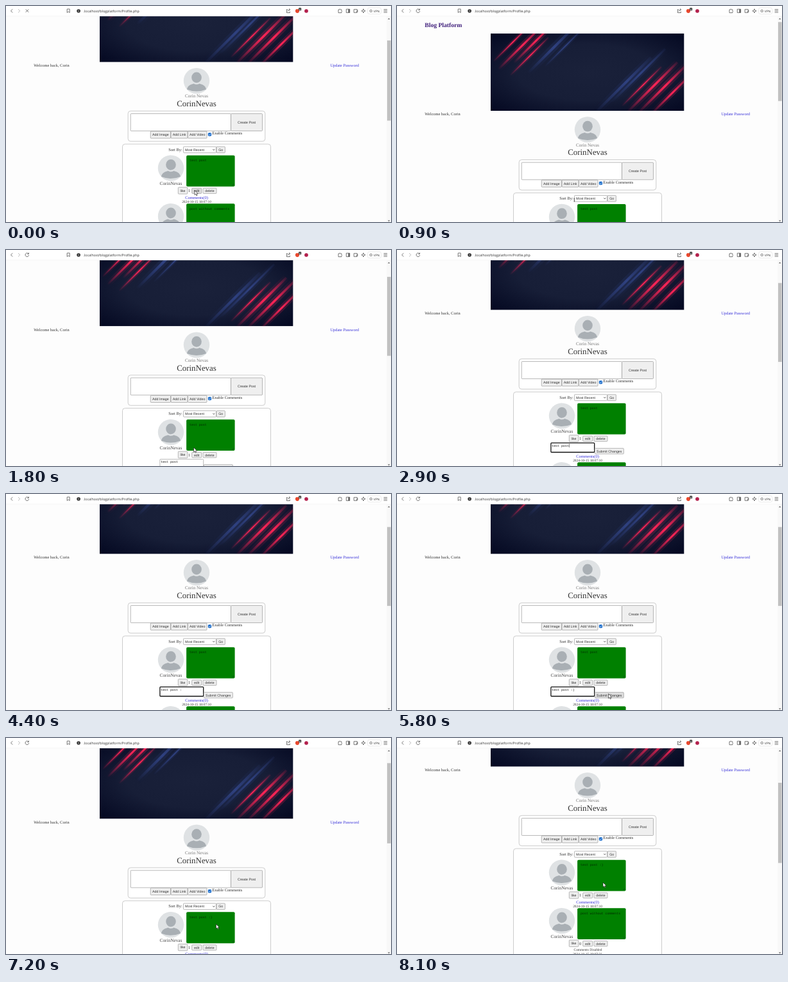
Write an HTML page that moves like this. It is 600 by 338 pixels and loops after 8.2 s.

```html
<!DOCTYPE html>
<html lang="en">
<head>
<meta charset="utf-8">
<title>Profile page</title>
<style>
  html, body { margin: 0; width: 100%; height: 100%; overflow: hidden; background: #fdfdfd; }
  svg { display: block; width: 600px; height: 338px; text-rendering: geometricPrecision; }
  .serif { font-family: "Liberation Serif", "Times New Roman", serif; }
  .sans { font-family: "Liberation Sans", Arial, sans-serif; }
  .mono { font-family: "Liberation Mono", monospace; white-space: pre; }
  .ui { font-family: "Open Sans", sans-serif; }
  .icon { fill: none; stroke: #555; stroke-width: .8; }
</style>
</head>
<body>
<svg id="stage" viewBox="0 0 600 338"></svg>
<script>
const LOOP = 8200, STEP = 100;
const FORM_OPEN = 300, FORM_SENT = 6200, FORM_HEIGHT = 17;
const USER = { first: 'Corin', full: 'Corin Nevas', login: 'CorinNevas' };
const LINK = '#3730d8', INK = '#333';
const ARROW = 'M0 0V7.2L1.7 5.7 2.9 8.3 4 7.8 2.9 5.3H5.2Z', IBEAM = 'M0 1H1.6M.8 1V6M0 6H1.6';

// Builders for the repeated pieces of the page
const text = (x, y, str, { size = 6.4, fill = INK, anchor = 'start', font = 'serif', more = '' } = {}) =>
  `<text class="${font}" x="${x}" y="${y}" font-size="${size}" fill="${fill}" text-anchor="${anchor}" ${more}>${str}</text>`;

const centered = (x, y, str, size, fill) => text(x, y, str, { size, fill, anchor: 'middle' });

const box = (x, y, w, h, { fill = '#fff', stroke = '#8a8a8a', r = 1, line = .6, more = '' } = {}) =>
  `<rect x="${x}" y="${y}" width="${w}" height="${h}" rx="${r}" fill="${fill}" stroke="${stroke}" stroke-width="${line}" ${more}/>`;

const button = (x, y, w, h, label, id = '') =>
  box(x, y, w, h, { fill: '#efefef', more: id && `id="${id}"` }) +
  text(x + w / 2, y + h / 2 + 1.9, label, { size: 5.33, anchor: 'middle', font: 'sans' });

const avatar = (x, y) => `<g transform="translate(${x} ${y})">
  <circle r="20.2" fill="#dfe2e4"/>
  <ellipse cy="-5.2" rx="7.8" ry="8.4" fill="#a9afb4"/>
  <path d="M-15 13.5C-14 7 -8 5.5 -4.5 4.5Q0 7 4.5 4.5C8 5.5 14 7 15 13.5Q8 16.5 0 16.5T-15 13.5Z" fill="#a9afb4"/></g>`;

const post = (y, message, likes, ids = {}) =>
  avatar(257, y + 19.7) +
  centered(257, y + 46.4, USER.login, 7.3, '#444') +
  box(281.1, y - .2, 75.5, 48.8, { fill: '#008000', stroke: 'none', r: 2 }) +
  text(286, y + 9.2, message, { size: 4.95, fill: '#022802', font: 'mono', more: ids.message ? `id="${ids.message}"` : '' }) +
  `<path d="M352.5 ${y + 46.8}l2.5 -2.5M354 ${y + 47}l1 -1" stroke="#033" stroke-width=".5"/>` +
  button(268.3, y + 49.8, 14.5, 10.4, 'like') +
  text(285.5, y + 57.2, likes, { anchor: 'middle' }) +
  button(289.7, y + 51.2, 15, 8.3, 'edit', ids.edit) +
  button(307, y + 51.2, 21, 8.3, 'delete');

// A bright diagonal line over its own wide, faint halo
const streak = (x, y, run, width, color) => {
  const line = `<path d="M${x} ${y}l${run} ${-run}" stroke="url(#${color})"`;
  return `${line} stroke-width="${width * 3}" opacity=".22"/>${line} stroke-width="${width}"/>`;
};

const glow = (id, color) => `<linearGradient id="${id}" x1="0" y1="1" x2="1" y2="0">
  <stop offset="0" stop-color="${color}" stop-opacity="0"/><stop offset=".55" stop-color="${color}"/>
  <stop offset="1" stop-color="${color}" stop-opacity=".1"/></linearGradient>`;

const banner = `<svg x="146" y="46.3" width="301.3" height="121">
  <rect width="302" height="121" fill="url(#night)"/>
  ${[[58, 62, 74, 4], [84, 52, 60, 2], [164, 123, 86, 4], [188, 108, 84, 3]].map(s => streak(...s, 'blue')).join('')}
  ${[[4, 44, 56, 2], [12, 56, 70, 3], [30, 66, 60, 2], [36, 46, 64, 3],
     [204, 114, 62, 2], [213, 123, 78, 3.5], [230, 124, 76, 3.5], [250, 126, 62, 3]].map(s => streak(...s, 'red')).join('')}
</svg>`;

const page = `<g id="page">
  ${text(43.3, 36.4, 'Blog Platform', { size: 9.65, fill: '#40207c', more: 'font-weight="bold"' })}
  ${banner}
  ${text(43.3, 174.7, 'Welcome back, ' + USER.first)}
  ${text(550, 174.7, 'Update Password', { fill: LINK, anchor: 'end' })}
  ${avatar(297, 196.6)}
  ${centered(297, 222.8, USER.full, 7.2, '#777')}
  ${centered(297, 236.6, USER.login, 12.9)}
  ${box(190.2, 243.8, 213.6, 47.4, { stroke: '#aaa', r: 4 })}
  ${box(194.2, 248, 156.3, 27)}
  ${button(350.5, 248, 49, 27, 'Create Post')}
  ${button(225.2, 275.5, 31.3, 11, 'Add Image')}
  ${button(257, 275.5, 26, 11, 'Add Link')}
  ${button(283.4, 275.5, 29.6, 11, 'Add Video')}
  ${box(315.2, 278.2, 4.6, 4.6, { fill: '#1167c9', stroke: '#1167c9' })}
  <path d="M316.2 280.6l1 1.1 1.8 -2.3" fill="none" stroke="#fff" stroke-width=".7"/>
  ${text(321.3, 280.8, 'Enable Comments')}
  ${box(181.5, 295.6, 231, 400, { stroke: '#aaa', r: 4 })}
  ${text(253.2, 306.3, 'Sort By:')}
  ${box(276.5, 299.6, 51, 9.6)}
  ${text(279, 306.3, 'Most Recent', { size: 5.33, font: 'sans' })}
  <path d="M322.3 303.6l1.5 1.6 1.5 -1.6" fill="none" stroke="#333" stroke-width=".8"/>
  ${button(328, 299.6, 13.4, 9.6, 'Go')}
  ${post(313.4, '', 1, { message: 'message', edit: 'edit' })}
  <g id="form">
    ${box(239.9, 375.4, 67.8, 14.6, { more: 'id="field"' })}
    ${text(241.2, 381.2, '', { size: 4.95, fill: '#111', font: 'mono', more: 'id="draft"' })}
    <rect id="caret" y="376.9" width=".5" height="5.5" fill="#000"/>
    ${button(308.3, 383.8, 45, 8.8, 'Submit Changes', 'submit')}
  </g>
  <g id="below">
    ${centered(297, 381.1, 'Comments(0)', 6.5, LINK)}
    ${centered(297, 387.3, '2024-10-15 18:07:10', 5.4)}
    ${post(388.9, 'post without comments', 0)}
    ${centered(297.5, 455.8, 'Comments Disabled', 5.4)}
    ${centered(297, 462.3, '2024-10-15 18:07:31', 5.4)}
  </g>
</g>`;

const toolbar = `<rect width="600" height="16" fill="#fff"/>
  <path d="M0 15.7H600" stroke="#f1f1f1" stroke-width=".6"/>
  <g class="icon">
    <path d="M10.3 5l-2.8 2.7 2.8 2.7"/>
    <path d="M19 5l2.8 2.7 -2.8 2.7" stroke="#aaa"/>
    <path id="stop" d="M30.7 5.2l4.6 4.6m0 -4.6l-4.6 4.6"/>
    <path id="reload" d="M35 5.8a2.8 2.8 0 1 0 .6 2.2M35.4 4.2v2.1h-2.1"/>
    <path d="M95.2 4.8h4v5.6l-2 -1.6 -2 1.6z"/>
    <path d="M439 5.5h-1.6v5h5v-2M439 8.5q.3 -2.8 3.6 -2.8M441 4l1.8 1.7 -1.8 1.7"/>
    <path d="M518 5.8h1.4a1 1 0 0 1 2 0h1.5v1.6a1 1 0 0 1 0 1.8v1.4h-4.9z"/>
    <path d="M530.3 5h5.4v5.4h-5.4z"/><path d="M534.4 5v5.4" stroke-width="2"/>
    <path d="M542.2 5.3h5v5h-5zM547.2 6.6h.7v2.4h-2.5"/>
    <path d="M557 4.6l.9 2.2 2.2 .9 -2.2 .9 -.9 2.2 -.9 -2.2 -2.2 -.9 2.2 -.9z"/>
    <path d="M588.6 5.4h5.6m-5.6 2.3h5.6m-5.6 2.3h5.6"/>
  </g>
  <circle cx="113.1" cy="7.7" r="2.8" fill="#333"/>
  <path d="M113.1 7.2v2M113.1 5.8v.7" stroke="#fff" stroke-width=".7"/>
  ${text(120.6, 9.6, '.localhost/blogplatform/Profile.php', { size: 5.33, font: 'ui' })}
  <circle cx="454" cy="7.8" r="3.1" fill="#e8492f"/>
  ${box(456, 2.7, 4.2, 4.6, { fill: '#444', stroke: 'none' })}
  ${text(458.1, 6.5, '6', { size: 4, fill: '#fff', anchor: 'middle', font: 'ui' })}
  <circle cx="468" cy="7.8" r="2.9" fill="#b3214d"/>
  ${box(563.6, 2.8, 21, 9.8, { stroke: '#ddd', r: 2.5 })}
  <circle cx="568.7" cy="7.7" r="1.7" class="icon"/>
  ${text(572.8, 9.5, 'VPN', { size: 4.8, font: 'ui' })}`;

const scrollbar = `<rect x="593" y="16" width="7" height="322" fill="#f8f8f8"/>
  <path d="M595 21l1.7 -2.2 1.7 2.2zM595 335.3l1.7 2.2 1.7 -2.2z" fill="#777"/>
  <rect id="thumb" x="594" width="5.6" fill="#c1c1c1"/>`;

stage.innerHTML = `<defs>${glow('red', '#ff2456')}${glow('blue', '#2f4180')}
  <radialGradient id="night" r=".72"><stop stop-color="#1a213a"/>
  <stop offset=".5" stop-color="#171e37"/><stop offset="1" stop-color="#030720"/></radialGradient></defs>
  ${page}${scrollbar}${toolbar}
  <path id="cursor" fill="#fff" stroke="#111" stroke-width=".6"/>`;

const $ = id => document.getElementById(id);
const show = (id, on) => $(id).setAttribute('visibility', on ? 'visible' : 'hidden');
const move = (id, x, y) => $(id).setAttribute('transform', `translate(${x} ${y})`);
const set = (id, attrs) => Object.entries(attrs).forEach(([k, v]) => $(id).setAttribute(k, v));

// Keys are [time, ...values]; a repeated time makes a hard change
const SCROLL = [[0, 79.5], [FORM_OPEN, 79.5], [FORM_OPEN, 0], [840, 0], [900, 3.2], [1800, 48], [2300, 73.5],
  [FORM_SENT, 73.5], [FORM_SENT, 0], [6900, 0], [7800, 122.5], [LOOP, 122.5]];
const POINTER = [[0, 294, 288.5], [300, 294, 288.5], [800, 275.5, 300], [1000, 275.5, 300], [1800, 292.5, 309],
  [2500, 285, 305], [5500, 300, 306], [5800, 329.5, 312.6], [7000, 329.5, 313], [7800, 321, 226], [LOOP, 321, 226]];

function at(keys, t) {
  const i = keys.findLastIndex(k => k[0] <= t);
  const [a, b] = [keys[i], keys[i + 1]];
  const p = (t - a[0]) / (b[0] - a[0]);
  return a.slice(1).map((v, n) => v + (b[n + 1] - v) * p);
}

function draw(now) {
  const t = Math.floor(now % LOOP / STEP) * STEP;
  const [scroll] = at(SCROLL, t);
  const editing = t >= FORM_OPEN && t < FORM_SENT;
  const focused = editing && t >= 2600;
  const loading = t < 500 || (t >= 5900 && t < 6500);
  const typed = [3900, 4200, 4500].filter(key => t >= key).length;
  const draft = 'test post' + ' :)'.slice(0, typed);
  const overText = t >= 800 && t < 1200;

  move('page', 0, -scroll);
  move('below', 0, editing ? FORM_HEIGHT : 0);
  set('thumb', { y: 24 + scroll * .376, height: editing ? 123.5 : 125.5 });
  show('stop', loading);
  show('reload', !loading);

  $('message').textContent = t >= FORM_SENT ? 'test post :)' : 'test post';
  $('draft').textContent = draft;
  show('form', editing);
  set('field', focused ? { stroke: '#111', 'stroke-width': 1.3 } : { stroke: '#8a8a8a', 'stroke-width': .6 });
  set('caret', { x: 241.4 + draft.length * 2.97 });
  show('caret', focused && (t + 100) % 1000 < 500);
  set('edit', { fill: t < FORM_OPEN ? '#dedede' : '#efefef' });
  set('submit', { fill: t >= 5700 ? '#dedede' : '#efefef' });

  move('cursor', ...at(POINTER, t));
  set('cursor', { d: overText ? IBEAM : ARROW });
  show('cursor', t < 2600 || t >= 5600);
}

function loop() {
  draw(performance.now());
  requestAnimationFrame(loop);
}
loop();
</script>
</body>
</html>
```
